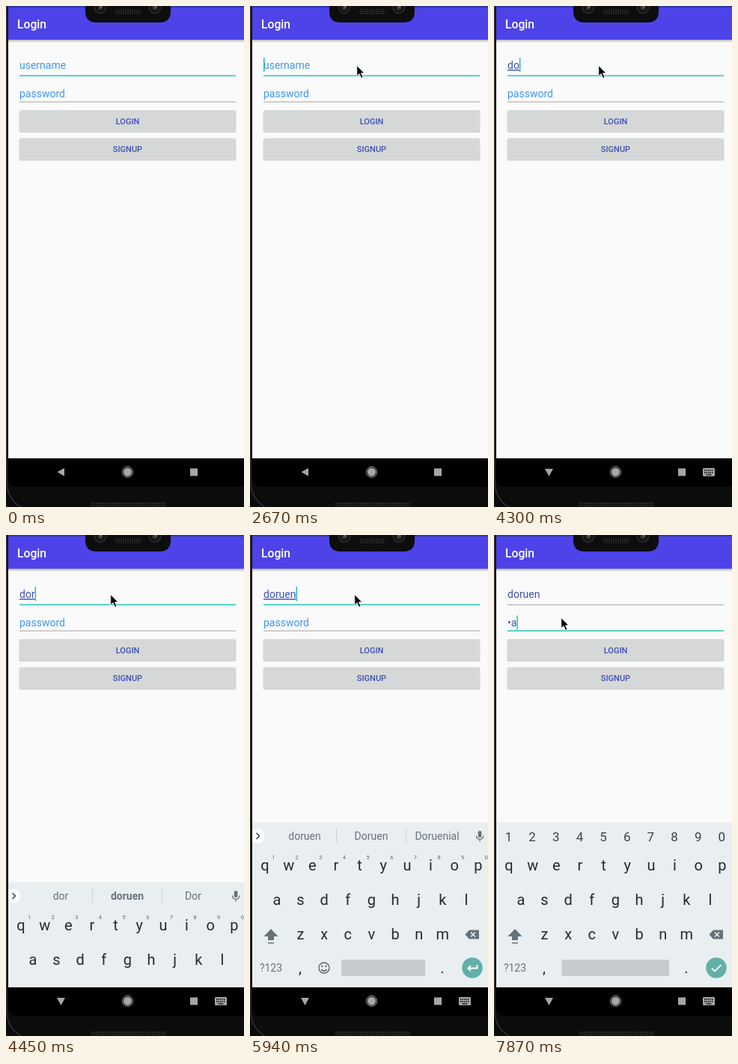
Write an HTML page that moves like this. It is 318 px wide and 669 px high and loops after 8 s.

```html
<!DOCTYPE html>
<html lang="en">
<head>
<meta charset="utf-8">
<title>Login screen</title>
<style>
html, body { margin: 0; width: 100%; height: 100%; overflow: hidden; background: #0b0b0b; }
svg { display: block; width: 318px; height: 669px; }
text { font-family: Roboto, sans-serif; font-size: 14px; }
.mid { text-anchor: middle; }
.hint { fill: #3f97f2; }
.typed { fill: #3f51b5; }
.button { font-size: 11px; font-weight: 500; fill: #3f51b5; }
.key { font-size: 20px; fill: #1f2c33; }
.digit { font-size: 17px; fill: #37444b; }
.alt { font-size: 7.5px; fill: #5d6b72; }
.word { fill: #66727a; }
.icon { fill: #66727a; }
.nav { fill: #a6a6a6; }
</style>
</head>
<body>
<svg viewBox="0 0 318 669">
  <defs>
    <linearGradient id="shade" x2="0" y2="1">
      <stop offset="0" stop-opacity=".28"/>
      <stop offset="1" stop-opacity="0"/>
    </linearGradient>
    <pattern id="mesh" width="3" height="3" patternUnits="userSpaceOnUse">
      <rect width="3" height="3" fill="#0c0c0c"/>
      <circle cx="1" cy="1" r=".9" fill="#3b3b3b"/>
    </pattern>
    <clipPath id="screen"><rect x="3" y="0" width="315" height="604"/></clipPath>
  </defs>

  <!-- phone body -->
  <rect width="318" height="669" fill="#0c0c0c"/>
  <path d="M.8 0V634Q1 658 20 669" fill="none" stroke="#3a3a3c" stroke-width="1.2"/>
  <path d="M3 0H318V642H15Q3 642 3 629Z"/>
  <rect x="113" y="662" width="101" height="7" fill="url(#mesh)"/>

  <!-- app -->
  <rect x="3" width="315" height="604" fill="#fafafa"/>
  <rect x="3" width="315" height="45" fill="#4d43e9"/>
  <rect x="3" width="315" height="2" fill="#2b37a6"/>
  <rect x="3" y="45" width="315" height="4" fill="url(#shade)"/>
  <text x="15" y="30" style="font-size:15.7px;font-weight:500" fill="#fff">Login</text>
  <path d="M106 0V7Q106 22 121 22H205Q220 22 220 7V0Z" fill="#0d0d0e"/>
  <rect x="145" y="4" width="36" height="7" rx="3" fill="url(#mesh)"/>
  <g id="lenses"></g>

  <g id="fields"></g>
  <g id="buttons"></g>

  <g clip-path="url(#screen)">
    <g id="keyboard">
      <rect x="3" y="384" width="315" height="222" fill="#e9eef1"/>
      <g id="keys"></g>
      <g id="wordBar">
        <path d="M115.5 392V411M208.5 392V411" stroke="#c9d0d4"/>
        <circle cx="10" cy="402" r="9.5" fill="#fff"/>
        <path d="M8.5 398L12.5 402L8.5 406" fill="none" stroke="#3c474d" stroke-width="1.6"/>
        <g class="icon">
          <rect x="304.8" y="395" width="4.6" height="9" rx="2.3"/>
          <path d="M302.5 401.5Q302.5 406.3 307.1 406.3T311.7 401.5M307.1 406V409.5" fill="none" stroke="#66727a" stroke-width="1.3"/>
        </g>
      </g>
      <path class="icon" d="M28 526L37.5 536H32V541H24V536H18.5ZM24 544H32V545.5H24Z"/>
      <path class="icon" d="M293 527.5H306V539.5H293L287.5 533.5Z"/>
      <path d="M295 530.5L301 536.5M301 530.5L295 536.5" stroke="#e9eef1" stroke-width="1.6"/>
      <text class="word mid" x="28" y="583">?123</text>
      <g id="emoji" fill="none" stroke="#56636a" stroke-width="1.4">
        <circle cx="99" cy="578" r="7"/>
        <path d="M95.3 580Q99 584.6 102.7 580"/>
        <path d="M96.5 574.5V577M101.5 574.5V577" stroke-width="1.8"/>
      </g>
      <rect id="space" y="567" height="22" rx="2" fill="#c6cbce"/>
      <circle cx="297" cy="578" r="13.7" fill="#62b0a8"/>
      <path id="action" fill="none" stroke="#fff" stroke-width="1.8"/>
    </g>
  </g>

  <!-- navigation bar -->
  <g class="nav">
    <path id="back"/>
    <circle cx="162.5" cy="622.3" r="5.6"/>
    <circle cx="162.5" cy="622.3" r="7" fill="none" stroke="#a6a6a6"/>
    <rect x="246" y="617.5" width="10" height="10"/>
    <g id="switcher">
      <rect x="279" y="617" width="16" height="11" rx="1.3"/>
      <path d="M281 620H293M281 623H293" stroke="#000" stroke-width="1.5" stroke-dasharray="1.5 1"/>
      <path d="M283.5 626H290.5" stroke="#000" stroke-width="1.2"/>
    </g>
  </g>

  <path id="pointer" d="M0 0V14L3.3 11L5.8 16.8L8.2 15.8L5.7 10.2H10Z" stroke="#fff" stroke-width=".8"/>
</svg>

<script>
const LOOP = 8000;
const $ = id => document.getElementById(id);
const text = (cls, x, y, s, id = '') => `<text class="${cls}" x="${x}" y="${y}" id="${id}">${s}</text>`;

// Latest value of a [time, value] list
const at = (steps, t) => steps.reduce((v, [start, next]) => t >= start ? next : v, steps[0][1]);
const between = (spans, t) => spans.some(([a, b]) => t >= a && t < b);
const show = (id, on) => $(id).style.display = on ? '' : 'none';

const pointerPath = [
  [1480, [218, 123]], [1630, [190, 80]], [1780, [168, 70]], [1930, [160, 65]],
  [2070, [156, 72]], [2220, [154, 79]], [2520, [147, 79]], [2670, [142, 79]],
  [2810, [140, 79]], [2960, [139, 79]], [6390, [124, 86]], [6540, [103, 100]],
  [6690, [89, 110]]
];
const caretOn = [
  [440, 1040], [1480, 2070], [2520, 2960], [3410, 5200],
  [5650, 6540], [6980, 7430], [7720, LOOP]
];
const userText = [[0, ''], [4010, 'd'], [4300, 'do'], [4450, 'dor'], [4600, 'dorue'], [5940, 'doruen']];
const passText = [[0, ''], [7720, 'n'], [7870, '•a']];
const words = [
  [0, ['dor', 'doruen', 'Dor']],
  [4750, ['dorue', 'doruen', 'Doruen']],
  [5940, ['doruen', 'Doruen', 'Doruenial']]
];
const slide = [[0, 230], [4450, 80], [4600, 0]];
const KEYBOARD = 4010, PRESS = 6830, SWITCH = 6980;

function build() {
  $('lenses').innerHTML = [126, 199].map(x =>
    `<circle cx="${x}" cy="2" r="8.5" fill="#292929"/><circle cx="${x}" cy="2" r="6.5" fill="#101010"/>
     <circle cx="${x}" cy="2" r="3.5" fill="#3a3434"/><circle cx="${x + 1}" cy="1" r="1.2" fill="#777"/>`).join('');

  $('fields').innerHTML = [['user', 84], ['pass', 122]].map(([id, y]) =>
    text('hint', 18, y, id + (id === 'user' ? 'name' : 'word'), id + 'Hint') +
    text('typed', 18, y, '', id) +
    `<rect id="${id}Line" x="18" width="289"/>`).join('') +
    '<rect id="caret" width="1.5" height="19" fill="#25c3b5"/>';

  $('buttons').innerHTML = [['LOGIN', 139], ['SIGNUP', 176.5]].map(([label, y]) =>
    `<rect x="17.5" y="${y + 1}" width="290" height="29" rx="2" fill="#000" opacity=".16"/>
     <rect x="18" y="${y}" width="289" height="28.5" rx="2" fill="#d6d8d7"/>` +
    text('button mid', 162.5, y + 18.5, label)).join('');

  const column = i => 20 + i * 31.65;
  const digits = [...'1234567890'];
  const row = (letters, first, y) => [...letters].map((c, i) =>
    text('key mid', column(first + i), y, c)).join('');
  $('keys').innerHTML =
    row('qwertyuiop', 0, 448) + row('asdfghjkl', .5, 494) + row('zxcvbnm', 1.5, 540) +
    text('key mid', 67, 585, ',') + text('key mid', 257, 585, '.') +
    '<g id="alts">' + digits.map((d, i) => text('alt mid', column(i) + 11, 433, d)).join('') + '</g>' +
    '<g id="digits">' + digits.map((d, i) => text('digit mid', column(i) - .5, 409, d)).join('') + '</g>';
  $('wordBar').insertAdjacentHTML('beforeend',
    [73, 162, 250].map((x, i) => text('word mid', x, 407, '', 'word' + i)).join(''));
}

function setField(id, value, composing) {
  $(id).textContent = value;
  $(id).style.textDecoration = composing ? 'underline' : 'none';
  show(id + 'Hint', !value);
}

function setLine(id, y, active) {
  const line = $(id + 'Line');
  line.setAttribute('y', active ? y - .7 : y - .3);
  line.setAttribute('height', active ? 1.6 : 1);
  line.setAttribute('fill', active ? '#35cabd' : '#a3a3a3');
}

function draw(t) {
  const onPass = t >= SWITCH;
  const open = t >= KEYBOARD;

  setField('user', at(userText, t), !onPass);
  setField('pass', at(passText, t), false);
  setLine('user', 93, !onPass);
  setLine('pass', 127.8, t >= PRESS);

  const field = $(onPass ? 'pass' : 'user');
  const width = field.textContent ? field.getComputedTextLength() : 0;
  $('caret').setAttribute('x', 18 + width);
  $('caret').setAttribute('y', onPass ? 107.5 : 69);
  show('caret', between(caretOn, t));

  $('keyboard').setAttribute('transform', `translate(0 ${at(slide, t)})`);
  show('keyboard', open);
  show('wordBar', !onPass);
  show('alts', !onPass);
  show('emoji', !onPass);
  show('digits', onPass);
  at(words, t).forEach((w, i) => $('word' + i).textContent = w);
  $('word1').style.fontWeight = t < 5940 ? 700 : 400;
  const left = onPass ? 90.5 : 122;
  $('space').setAttribute('x', left);
  $('space').setAttribute('width', 234 - left);
  $('action').setAttribute('d', onPass
    ? 'M291 578.5L295 582.5L303.5 574'
    : 'M303.5 574V578.5H291.5M295 574.8L291.3 578.5L295 582.2');

  $('back').setAttribute('d', open ? 'M68 618H79L73.5 628Z' : 'M68.5 622.3L78 617V627.8Z');
  show('switcher', open);

  const [x, y] = at(pointerPath, t);
  $('pointer').setAttribute('transform', `translate(${x + .8} ${y + .5})`);
  show('pointer', t >= 1480);
}

build();
const start = performance.now();
function tick() {
  draw((performance.now() - start) % LOOP);
  requestAnimationFrame(tick);
}
tick();
</script>
</body>
</html>
```
